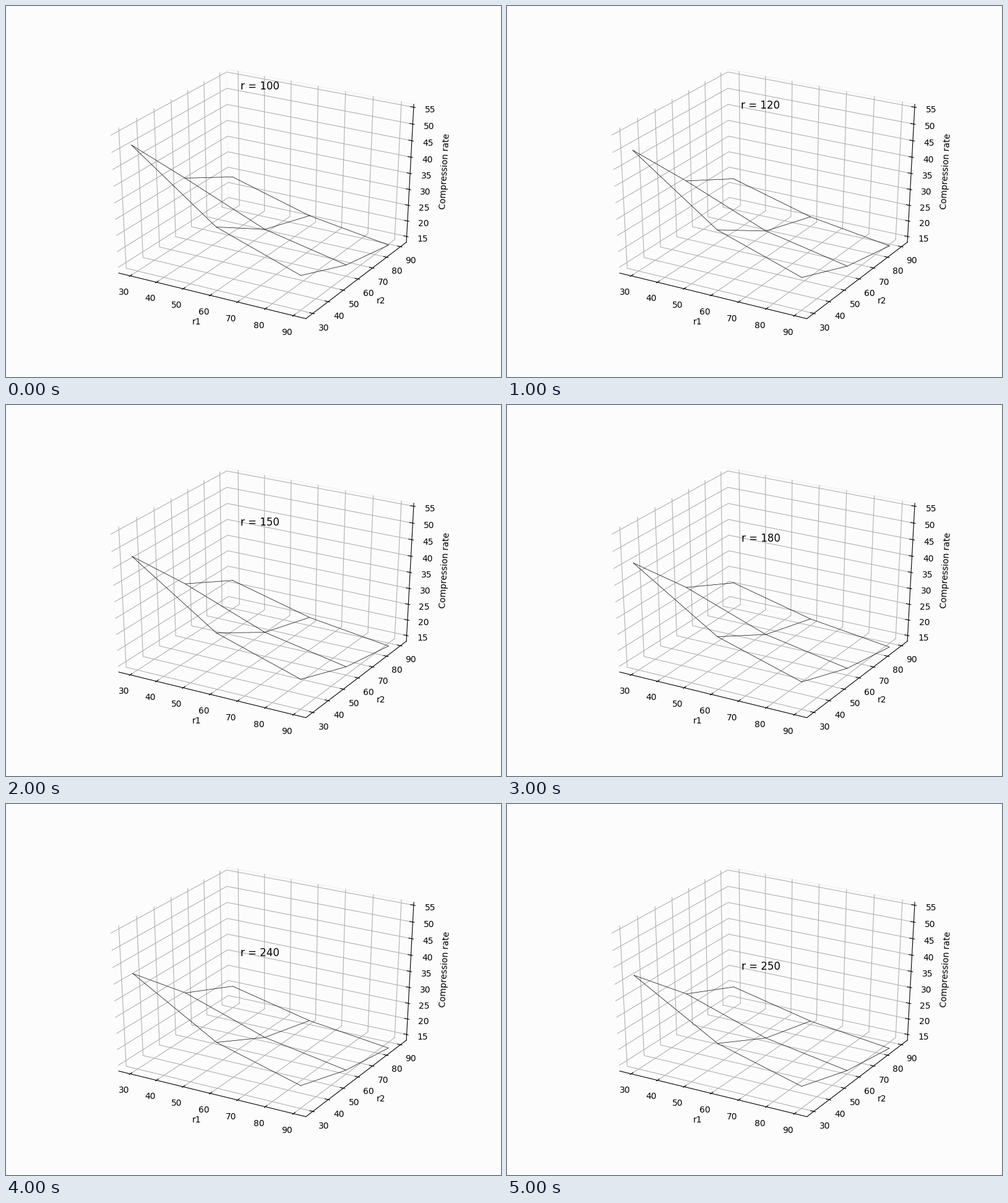
A matplotlib script that plays this animation: 800x600 px, repeating every 6000 ms.

```python
import numpy as np
import matplotlib.pyplot as plt
from matplotlib.animation import FuncAnimation

plt.rcParams["font.family"] = "DejaVu Sans"

W, H, DPI = 800, 600, 100
BG, GRID, INK = "#fcfcfc", "#b0b0b0", "black"

RANKS = [100, 120, 150, 180, 240, 250]
NODES = np.array([30, 60, 90])
LOW = np.array([27, 27, 14])
SPAN = np.array([66, 66, 41])

# Plot area in pixels: left, bottom, width, height
LEFT, BOTTOM, WIDE, HIGH = 100, 66, 620, 462

# Camera: azimuth -60, elevation 30, distance 10
DIST = 10
AZIM, ELEV = np.radians(-60), np.radians(30)
TOWARD = np.array([np.cos(AZIM) * np.cos(ELEV),
                   np.sin(AZIM) * np.cos(ELEV), np.sin(ELEV)])
RIGHT = np.array([-np.sin(AZIM), np.cos(AZIM), 0])
UP = np.cross(TOWARD, RIGHT)

# Half size of the box, and offsets from it, in unit cube lengths
EDGE = 0.5 + 1 / 48
STEP = 1 / 12
PER_POINT = 48 / (0.72 * (WIDE + HIGH)) * STEP
TICK_PAD = EDGE + 11.5 * PER_POINT
LABEL_PAD = EDGE + 25 * PER_POINT


def project(points):
    """Centred unit cube coordinates to stage pixels (y up)."""
    p = np.asarray(points, float)
    depth = DIST - p @ TOWARD
    x = LEFT + (p @ RIGHT / depth + 0.095) / 0.185 * WIDE
    y = BOTTOM + (p @ UP / depth + 0.095) / 0.185 * HIGH
    return x, y


def unit(value, axis):
    return (value - LOW[axis]) / SPAN[axis] - 0.5


def rate(r, r1, r2):
    """Full size divided by the size of the factors."""
    return 9 * 512 ** 2 / (9 * r + (512 + r) * (r1 + r2) + 9 * r1 * r2)


fig = plt.figure(figsize=(W / DPI, H / DPI), dpi=DPI, facecolor=BG)
ax = fig.add_axes([0, 0, 1, 1])
ax.set_xlim(0, W)
ax.set_ylim(0, H)
ax.axis("off")


def line(points, color=INK, lw=0.8, z=2):
    return ax.plot(*project(points), color=color, lw=lw, zorder=z)[0]


def label(point, text, va="center", angle=0):
    x, y = project(point)
    ax.text(x, y, text, ha="center", va=va, rotation=angle, fontsize=10)


def draw_box():
    e = EDGE
    line([(-e, e, e), (e, e, e)], "#f0f0f0", z=0)
    line([(-e, e, e), (-e, e, -e), (e, e, -e)], "#f6f6f6", z=0)

    for v in range(30, 91, 10):
        a = unit(v, 0)
        line([(a, -e, -e), (a, e, -e), (a, e, e)], GRID, z=1)
        line([(a, -e - 0.1 * STEP, -e), (a, -e + 0.2 * STEP, -e)])
        label((a, -TICK_PAD, -TICK_PAD), str(v), "top")

        line([(e, a, -e), (-e, a, -e), (-e, a, e)], GRID, z=1)
        line([(e + 0.1 * STEP, a, -e), (e - 0.2 * STEP, a, -e)])
        label((TICK_PAD, a, -TICK_PAD), str(v), "top")

    for v in range(15, 56, 5):
        a = unit(v, 2)
        line([(-e, -e, a), (-e, e, a), (e, e, a)], GRID, z=1)
        line([(e + 0.1 * STEP, e, a), (e - 0.2 * STEP, e, a)])
        label((TICK_PAD, TICK_PAD, a), str(v), "top")

    line([(-e, -e, -e), (e, -e, -e)])
    line([(e, -e, -e), (e, e, -e)])
    upright = line([(e, e, -e), (e, e, e)])

    (x0, x1), (y0, y1) = upright.get_data()
    tilt = np.degrees(np.arctan2(y1 - y0, x1 - x0))
    label((0, -LABEL_PAD, -LABEL_PAD), "r1")
    label((LABEL_PAD, 0, -LABEL_PAD), "r2")
    label((LABEL_PAD, LABEL_PAD, 0), "Compression rate", angle=tilt)


draw_box()
wires = [ax.plot([], [], color=INK, lw=0.5, zorder=4)[0] for _ in range(6)]
title = ax.text(LEFT + WIDE / 2, 0, "", ha="center", va="baseline",
                fontsize=12, zorder=5)


def update(i):
    r = RANKS[i]
    r1, r2 = np.meshgrid(NODES, NODES, indexing="ij")
    mesh = np.stack([unit(r1, 0), unit(r2, 1), unit(rate(r, r1, r2), 2)], -1)
    for k in range(3):
        wires[k].set_data(*project(mesh[k]))
        wires[k + 3].set_data(*project(mesh[:, k]))
    title.set_text(f"r = {r}")
    title.set_y(round(BOTTOM + 399 * 0.9218 ** i))
    return wires + [title]


anim = FuncAnimation(fig, update, frames=len(RANKS), interval=1000,
                     init_func=lambda: update(0), repeat=True, repeat_delay=0)
plt.show()
```
